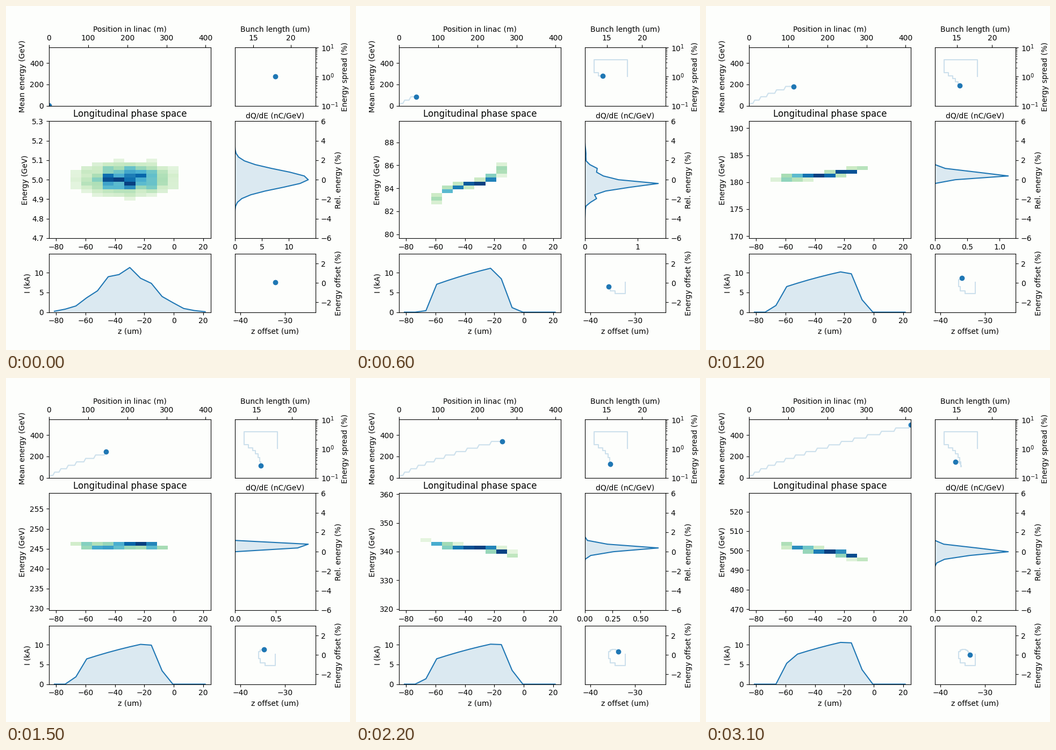
Animation, 640 px wide and 640 px high, one loop 3200 ms. Source, as a matplotlib script:

```python
import numpy as np
import matplotlib.pyplot as plt
from matplotlib.animation import FuncAnimation

FRAMES, INTERVAL = 32, 100
BLUE, PAPER = "#1f77b4", "#fdfefc"
NZ, NE = 15, 31                      # bins along z and along energy
CHARGE, I_SUM = 1.58, 65.4           # nC, summed current in kA
E0, GAIN, WINDOW = 5.0, 31.9, 0.06   # GeV, GeV per stage, relative half range
Z_MIN, Z_MAX = -84.93, 25.07         # um
STEP = 200 * WINDOW / NE             # energy bin in percent

J = np.arange(NZ)
BIN = np.arange(NE) - NE // 2
Z = Z_MIN + (J + .5) * (Z_MAX - Z_MIN) / NZ
REL = BIN * STEP

# Each frame is one half stage: acceleration changes the energy (index e),
# the following transport changes the bunch along z (index c).
frame = np.arange(FRAMES)
C, E = frame // 2, (frame + 1) // 2


def logistic(x):
    return 1 / (1 + np.exp(-x))


# Accelerator stages
nominal = np.where(E > 0, E0 + GAIN * (E - .5), E0)
flats = np.r_[0, np.cumsum(np.sqrt(E0 + GAIN * (np.arange(1, 16) - .5)))]
position = np.where(E > 0, 2.75 + 4.8 * (E - 1) + 1.5205 * flats[C], 0)

# Bunch averages
length = np.where(C > 0, 15.6 - np.where(C < 8, .049, .016) * (C - 8) ** 2, 17.93)
z_off = np.where(C > 0, -33.25 - 2 * C ** 1.6 * np.exp(-C / 2.06), -32.2)
e_off = (.6 * np.clip((16 - E) / 8, 0, 1) ** 1.15
         - 1.75 * np.exp(-((E - .5) / 3.25) ** 2))
e_off[0] = .07
spread = np.exp(np.interp(E, [0, 1, 2, 5, 8, 9, 13, 16],
                          np.log([1, 3.75, 1.36, .66, .26, .24, .357, .35])))
energy = nominal * (1 + e_off / 100)


def current(c):
    """A normal bunch at first, then a ramp with two soft edges."""
    if c == 0:
        shape = np.exp(-.5 * ((Z - z_off[0]) / length[0]) ** 2)
        shape *= 1 - .07 * (-1.0) ** J
    else:
        left = 2.15 + .0115 * (c - 8) ** 2
        right = 9.7 - .014 * max(8 - c, 0) ** 2
        shape = 7.5 + .85 * (J - 4) - .03 * (J - 4) ** 2
        shape *= np.clip(J - left + .5, 0, 1) * np.clip((right - J) / 1.6 + .5, 0, 1)
    return I_SUM * shape / shape.sum()


def chirp(e, weights):
    """Mean energy and energy width of each z bin, in energy bins."""
    offset = e_off[2 * e - 1] if e else e_off[0]
    if e == 0:
        return np.full(NZ, offset / STEP), np.full(NZ, 2.37)
    u = np.clip((J - 6.5) / 3.5, -1.25, 1.25)
    a = -.95 + 2.7 * logistic((8 - e) / 1.8)
    b = -.4 + 2.6 * logistic(5.4 - e)
    c = -.93 + 5.1 * np.exp((3 - e) / 1.9)
    mu = a * u + b * u ** 2 + c * u ** 3
    slope = (a + 2 * b * u + 3 * c * u ** 2) / 3.5
    mu += offset / STEP - np.average(mu, weights=weights)
    return mu, np.hypot(.27, slope / np.sqrt(12))


def density(c, e):
    """Charge in each cell: rows are energy bins, columns are z bins."""
    weights = current(c)
    mu, sigma = chirp(e, weights)
    x = BIN[:, None, None] + np.linspace(-.5, .5, 41)
    cells = np.exp(-.5 * ((x - mu[:, None]) / sigma[:, None]) ** 2).mean(axis=2)
    return weights * cells / (sigma * np.sqrt(2 * np.pi))


def shades(cells, c):
    if c == 0:
        cells = cells * np.random.default_rng(4).uniform(.7, 1.2, cells.shape)
    return np.ma.masked_less(cells / cells.max(), .1)


plt.rcParams["font.family"] = "DejaVu Sans"
fig = plt.figure(figsize=(6.4, 6.4), dpi=100, facecolor=PAPER)
grid = fig.add_gridspec(3, 2, width_ratios=[2, 1], height_ratios=[1, 2, 1],
                        left=.125, right=.9, bottom=.11, top=.88, wspace=.2, hspace=.2)
axes = [[fig.add_subplot(grid[r, c], facecolor=PAPER) for c in range(2)] for r in range(3)]
(ax_s, ax_len), (ax_ps, ax_spec), (ax_cur, ax_off) = axes

for ax in (ax_s, ax_len):
    ax.xaxis.tick_top()
    ax.xaxis.set_label_position("top")
for ax in (ax_len, ax_spec, ax_off):
    ax.yaxis.tick_right()
    ax.yaxis.set_label_position("right")

ax_s.set(xlim=(0, position[-1]), ylim=(0, 1.1 * energy[-1]),
         xlabel="Position in linac (m)", ylabel="Mean energy (GeV)")
ax_len.set(yscale="log", ylim=(.1, 10), xlabel="Bunch length (um)",
           ylabel="Energy spread (%)")
ax_ps.set_title("Longitudinal phase space")
ax_ps.set_ylabel("Energy (GeV)")
ax_spec.xaxis.set_label_position("top")
ax_spec.set(ylim=(-6, 6), xlabel="dQ/dE (nC/GeV)", ylabel="Rel. energy (%)")
ax_cur.set(xlim=(Z_MIN, Z_MAX), ylim=(0, 14.85), xlabel="z (um)", ylabel="I (kA)")
ax_off.set(xlim=(-41.2, -23.2), ylim=(-3, 3), xlabel="z offset (um)",
           ylabel="Energy offset (%)")


def add_trail(ax, x, y):
    line, = ax.plot([], [], color=BLUE, alpha=.22)
    dot, = ax.plot([], [], "o", color=BLUE)
    return line, dot, x, y


def add_area(ax):
    area, = ax.fill([0, 0], [0, 0], color=BLUE, alpha=.15, lw=0)
    line, = ax.plot([], [], color=BLUE)
    return area, line


trails = [add_trail(ax_s, position, energy), add_trail(ax_len, length, spread),
          add_trail(ax_off, z_off, e_off)]
cur_area, cur_line = add_area(ax_cur)
spec_area, spec_line = add_area(ax_spec)
image = ax_ps.imshow(np.zeros((NE, NZ)), cmap="GnBu", vmin=0, vmax=1, origin="lower",
                     aspect="auto", interpolation="nearest")


def update(n):
    for line, dot, x, y in trails:
        line.set_data(x[:n + 1], y[:n + 1])
        dot.set_data(x[n:n + 1], y[n:n + 1])
    ax_len.set_xlim(min(.7 * length[0], .9 * length[:n + 1].min()), 1.3 * length[0])

    low, high = nominal[n] * (1 - WINDOW), nominal[n] * (1 + WINDOW)
    cells = density(C[n], E[n])
    image.set_data(shades(cells, C[n]))
    image.set_extent((Z_MIN, Z_MAX, low, high))
    ax_ps.set(xlim=(Z_MIN, Z_MAX), ylim=(low, high))

    amps = current(C[n])
    cur_line.set_data(Z, amps)
    cur_area.set_xy(np.column_stack([np.r_[Z[0], Z, Z[-1]], np.r_[0, amps, 0]]))

    spec = cells.sum(axis=1)
    spec *= CHARGE / spec.sum() / ((high - low) / NE)
    spec_line.set_data(spec, REL)
    spec_area.set_xy(np.column_stack([np.r_[0, spec, 0], np.r_[REL[0], REL, REL[-1]]]))
    ax_spec.set_xlim(0, 1.1 * spec.max())
    return []


anim = FuncAnimation(fig, update, frames=FRAMES, interval=INTERVAL,
                     init_func=lambda: update(0), repeat=True, repeat_delay=0)
plt.show()
```
